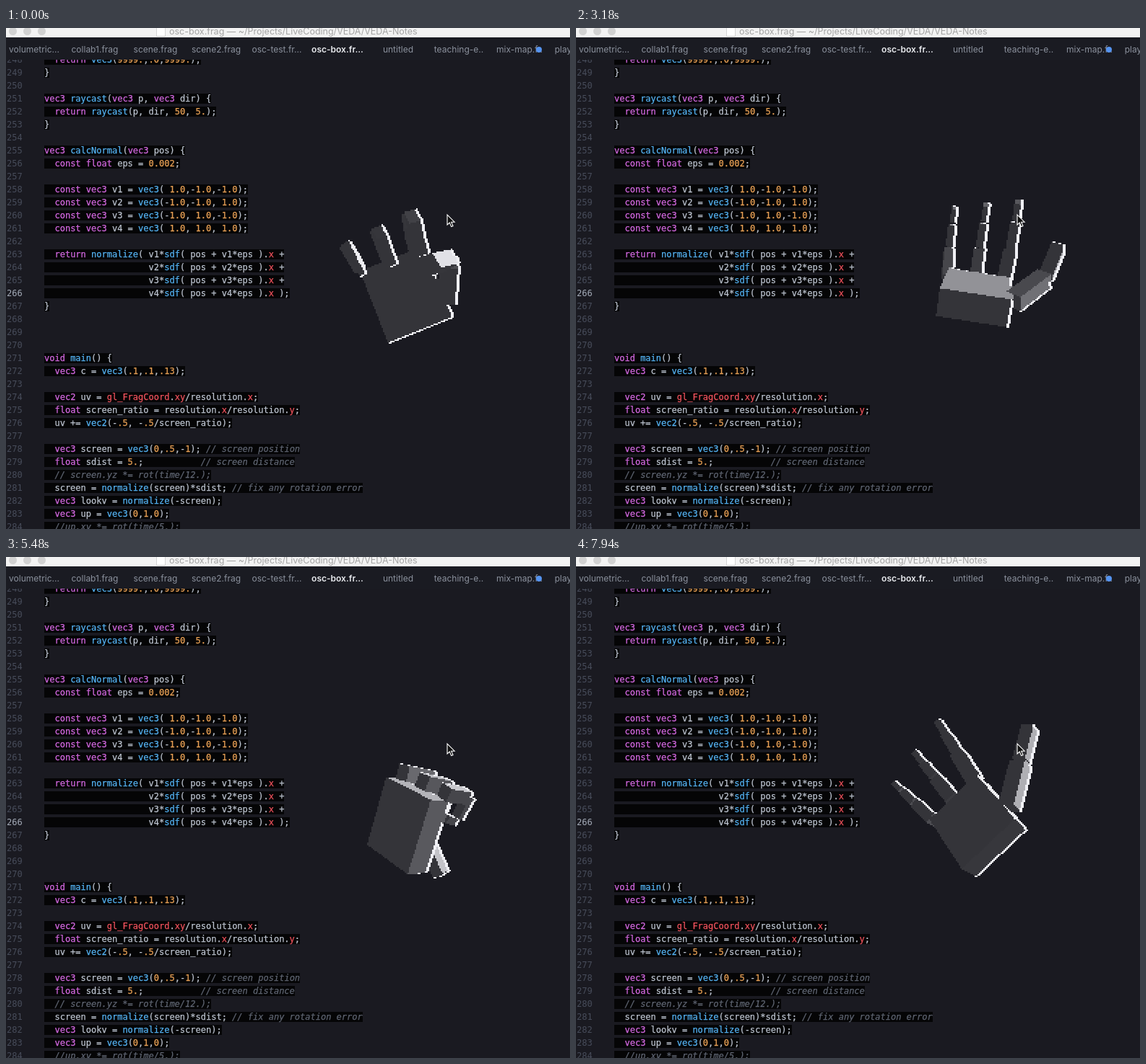
An HTML page with a canvas that plays this animation: 781 by 695 pixels, repeating every 8000 ms.

```html
<!DOCTYPE html>
<html lang="en">
<head>
<meta charset="utf-8">
<title>osc-box.frag</title>
<style>
  html, body { margin: 0; width: 100%; height: 100%; overflow: hidden; background: #1a1a21; }
  #stage { position: relative; width: 781px; height: 695px; overflow: hidden; background: #1a1a21; }
  #stage > * { position: absolute; }
  #code { left: 0; top: 35px; font: 12px/18px "DejaVu Sans Mono", monospace; color: #bcc3cf; white-space: pre; }
  #code div { position: relative; height: 18px; padding-left: 53px; }
  #code b { position: absolute; left: 1px; font-weight: normal; color: #474c5a; }
  #code b.current { color: #a4abb8; }
  #code span { background: #050506; -webkit-text-stroke: .25px; }
  #code i { font-style: normal; }
  #code .comment { color: #5f6572; font-style: italic; }
  #code .keyword { color: #d569e2; }
  #code .call { color: #55b4f5; }
  #code .field { color: #f0525c; }
  #code .number { color: #e8a055; }
  #tabs { left: 0; top: 12px; width: 781px; height: 32px; background: #1a1b22; font: 12px/35px Inter, sans-serif; color: #8b919d; }
  #tabs span { position: absolute; width: 84px; text-align: center; white-space: nowrap; }
  #tabs .active { color: #e8eaee; font-weight: 600; }
  #dot { left: 734px; top: 26px; width: 8px; height: 8px; border-radius: 50%; background: #5594f0; }
  #title { left: 0; top: 0; width: 781px; height: 13px; background: #f3f3f3; overflow: hidden; }
  #title span { position: absolute; left: 226px; top: -5px; font: 12.5px/20px Inter, sans-serif; color: #a4a4a4; white-space: nowrap; }
  #title i { position: absolute; top: -1px; width: 11px; height: 11px; border-radius: 50%; background: #d2d2d2; }
  #title u { position: absolute; left: 208px; top: -4px; width: 11px; height: 14px; background: #fff; border: 1px solid #d4d4d4; }
  #hand { left: 420px; top: 130px; width: 292px; height: 350px; image-rendering: pixelated; }
  #pointer { left: 609px; top: 257px; }
</style>
</head>
<body>
<div id="stage">
  <div id="code"></div>
  <canvas id="hand" width="146" height="175"></canvas>
  <div id="tabs"></div>
  <div id="dot"></div>
  <div id="title">
    <i style="left:4px"></i><i style="left:24px"></i><i style="left:44px"></i><u></u>
    <span>osc-box.frag — ~/Projects/LiveCoding/VEDA/VEDA-Notes</span>
  </div>
  <svg id="pointer" width="16" height="22"><path d="M2 2v14l3.3-3 2.3 5.6 2.4-1-2.3-5.4h4.4z" fill="#111" stroke="#fff" stroke-width="1.1"/></svg>
</div>
<script>
const source = `  return vec3(9999.,.0,9999.);
}

vec3 raycast(vec3 p, vec3 dir) {
  return raycast(p, dir, 50, 5.);
}

vec3 calcNormal(vec3 pos) {
  const float eps = 0.002;

  const vec3 v1 = vec3( 1.0,-1.0,-1.0);
  const vec3 v2 = vec3(-1.0,-1.0, 1.0);
  const vec3 v3 = vec3(-1.0, 1.0,-1.0);
  const vec3 v4 = vec3( 1.0, 1.0, 1.0);

  return normalize( v1*sdf( pos + v1*eps ).x +
                    v2*sdf( pos + v2*eps ).x +
                    v3*sdf( pos + v3*eps ).x +
                    v4*sdf( pos + v4*eps ).x );
}



void main() {
  vec3 c = vec3(.1,.1,.13);

  vec2 uv = gl_FragCoord.xy/resolution.x;
  float screen_ratio = resolution.x/resolution.y;
  uv += vec2(-.5, -.5/screen_ratio);

  vec3 screen = vec3(0,.5,-1); // screen position
  float sdist = 5.;           // screen distance
  // screen.yz *= rot(time/12.);
  screen = normalize(screen)*sdist; // fix any rotation error
  vec3 lookv = normalize(-screen);
  vec3 up = vec3(0,1,0);
  //up.xy *= rot(time/5.);`;

const kinds = ['comment', 'keyword', 'call', 'field', 'number'];
const tokens = /(\/\/.*)|\b(return|const|void|float|vec[23](?!\())\b|\b([a-zA-Z]\w*)(?=\()|(gl_FragCoord|(?<=\.)[xyzw]+\b)|(?<!\w)(\d+\.?\d*|\.\d+)/g;
const paint = line => line.replace(tokens, (text, ...groups) =>
  `<i class="${kinds[groups.slice(0, 5).findIndex(Boolean)]}">${text}</i>`);

document.getElementById('code').innerHTML = source.split('\n').map((line, i) =>
  `<div><b${i === 18 ? ' class="current"' : ''}>${248 + i}</b><span>${paint(line)}</span></div>`).join('');

document.getElementById('tabs').innerHTML =
  ['volumetric...', 'collab1.frag', 'scene.frag', 'scene2.frag', 'osc-test.fr...', 'osc-box.fr...',
    'untitled', 'teaching-e..', 'mix-map.f..', 'playground..'].map((name, i) =>
    `<span style="left:${i * 84 - 3}px"${i === 5 ? ' class="active"' : ''}>${name}</span>`).join('');

// Vector helpers: x right, y down, z away from the viewer.
const { sin, cos, min, max, sign, PI } = Math;
const dot = (a, b) => a[0] * b[0] + a[1] * b[1] + a[2] * b[2];
const cross = (a, b) => [a[1] * b[2] - a[2] * b[1], a[2] * b[0] - a[0] * b[2], a[0] * b[1] - a[1] * b[0]];
const along = (p, d, k) => p.map((v, i) => v + d[i] * k);
const unit = a => a.map(v => v / (Math.hypot(...a) || 1));
const radians = degrees => degrees * PI / 180;

// Key poses: time, then wrist roll, pitch, yaw and finger bend in degrees.
const keys = [
  [0, -22, 8, 3, 72],
  [560, -7, 33, 15, 25],
  [1170, 25, -27, 165, 100],
  [2190, -8, 3, 7, 2],
  [3180, 9, 72, 0, 54],
  [4470, 24, 8, 80, 80],
  [5000, 25, -27, 165, 100],
  [6330, -13, 29, 25, 62],
  [7350, -17, 12, 7, 2],
  [7940, -37, 39, -11, 4]
];

function poseAt(time) {
  const next = keys.findIndex(key => key[0] > time);
  if (next < 0) return keys[keys.length - 1].slice(1);
  const from = keys[next - 1], to = keys[next];
  const k = (time - from[0]) / (to[0] - from[0]), ease = k * k * (3 - 2 * k);
  return along(from, to.map((v, i) => v - from[i]), ease).slice(1);
}

function buildHand([roll, pitch, yaw, bend]) {
  const [r, p, y] = [roll, pitch, yaw].map(radians);
  const rolled = ([a, b, c]) => [a * cos(r) - b * sin(r), a * sin(r) + b * cos(r), c];
  const length = rolled([0, -cos(p), sin(p)]);
  const width = rolled([cos(y), sin(y) * sin(p), sin(y) * cos(p)]);
  const normal = cross(width, length);
  const toWorld = v => [0, 1, 2].map(i => width[i] * v[0] + length[i] * v[1] + normal[i] * v[2]);

  const boxes = [];
  const addBox = (centre, axes, size) =>
    boxes.push({ centre: toWorld(centre), axes: axes.map(toWorld), half: size.map(v => v / 2) });
  // Adds one bone and returns where the next one starts.
  const addBone = (joint, dir, side, size, thick, gap) => {
    addBox(along(joint, dir, size / 2), [side, dir, cross(side, dir)], [thick, size, thick]);
    return along(joint, dir, size + gap);
  };

  addBox([0, 0, 0], [[1, 0, 0], [0, 1, 0], [0, 0, 1]], [95, 104, 38]);

  for (let finger = 0; finger < 3; finger++) {
    const fan = .12 - .14 * finger, scale = 1 - .1 * finger;
    const side = [cos(fan), -sin(fan), 0];
    let joint = [38 - 43 * finger, 64, 0];
    for (let i = 0; i < 3; i++) {
      const angle = radians(bend + i * bend * bend / 90);
      const dir = [sin(fan) * cos(angle), cos(fan) * cos(angle), sin(angle)];
      joint = addBone(joint, dir, side, 58 * .72 ** i * scale, 23 * .76 ** i * scale, 6);
    }
  }

  // The thumb swings from its open direction across the palm as the fist tightens.
  const swing = 150 * (bend / 100) ** 3;
  let joint = [50, -26, 8];
  for (let i = 0; i < 2; i++) {
    const angle = radians(swing + i * min(swing * 1.2, 60));
    const dir = unit(along([.77, .63, 0].map(v => v * cos(angle)), [-.3, .2, .93], sin(angle)));
    const side = unit(cross(dir, [0, 0, 1]));
    joint = addBone(joint, dir, side, 66 * .8 ** i, 24 * .83 ** i, 4);
  }
  return boxes;
}

const canvas = document.getElementById('hand'), context = canvas.getContext('2d');
const { width: columns, height: rows } = canvas;
const image = context.createImageData(columns, rows);
const depth = new Float32Array(columns * rows), tone = new Float32Array(columns * rows);
const focal = 600, light = unit([.85, -.45, .1]);
const lit = amount => .205 + max(0, amount) ** 1.6;

function render(boxes) {
  for (const box of boxes) {
    const eye = along([0, 0, -focal], box.centre, -1);
    box.eye = box.axes.map(axis => dot(eye, axis));
    box.light = box.axes.map(axis => dot(light, axis));
  }
  for (let i = 0; i < depth.length; i++) {
    const ray = [i % columns * 2 - 134, Math.floor(i / columns) * 2 - 240, focal];
    depth[i] = 9;
    for (const box of boxes) {
      let near = 0, far = 9, shade = 0;
      for (let a = 0; a < 3 && near < far; a++) {
        const speed = dot(ray, box.axes[a]) || 1e-6, facing = sign(speed);
        const enter = (-facing * box.half[a] - box.eye[a]) / speed;
        far = min(far, (facing * box.half[a] - box.eye[a]) / speed);
        if (enter > near) { near = enter; shade = -facing * box.light[a]; }
      }
      if (near < far && near < depth[i]) { depth[i] = near; tone[i] = lit(shade); }
    }
  }
  for (let i = 0; i < depth.length; i++) {
    const rim = depth[i + 2] > depth[i] + .04; // bright right-hand outline
    const grey = 255 * (rim ? .94 : min(tone[i], .94));
    image.data.set([grey, grey, grey + 5, depth[i] < 9 ? 255 : 0], i * 4);
  }
  context.putImageData(image, 0, 0);
}

let shown = -1;
function frame() {
  const time = Math.floor(performance.now() % 8000 / 90) * 90;
  if (time !== shown) render(buildHand(poseAt(shown = time)));
  requestAnimationFrame(frame);
}
frame();
</script>
</body>
</html>
```
